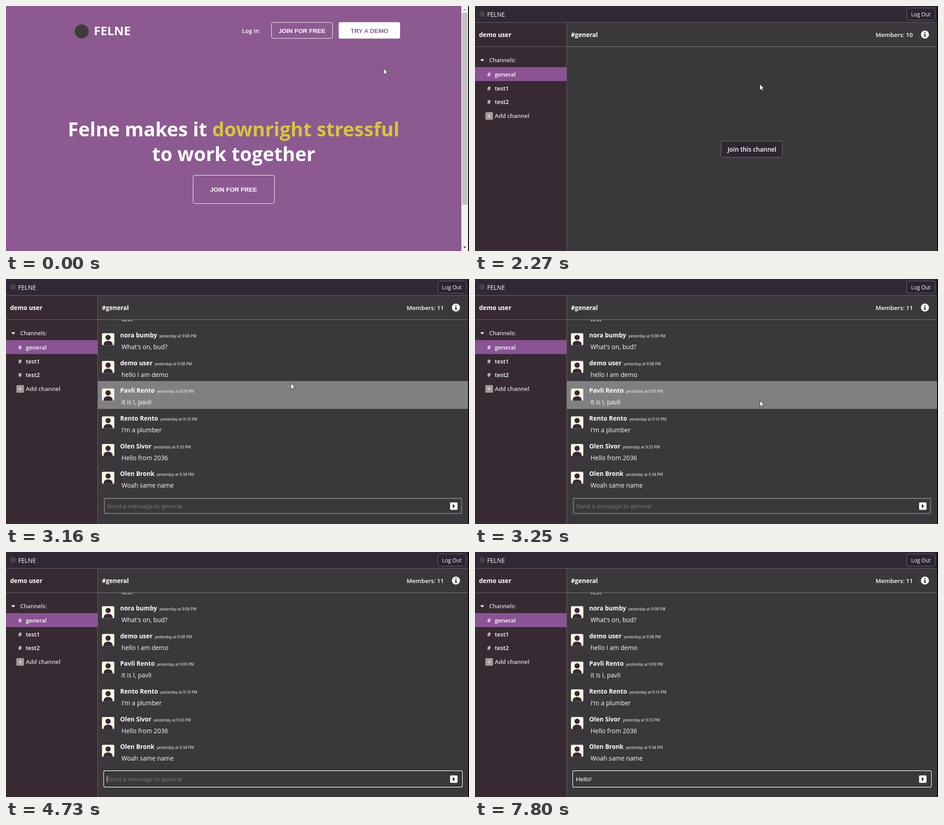
These frames come from a looping animation (1028x545 px, 8 s). An HTML page:

```html
<!DOCTYPE html>
<html lang="en">
<head>
<meta charset="utf-8">
<title>Team chat demo</title>
<style>
html, body { margin: 0; width: 100%; height: 100%; overflow: hidden; background: #000; }
svg { display: block; width: 1028px; height: 545px; font: 13.6px "Open Sans", "Noto Sans", sans-serif; fill: #fff; }
.arial { font-family: "Liberation Sans", Arial, sans-serif; }
.b { font-weight: 700; }
.s { font-weight: 600; }
.mid { text-anchor: middle; }
.end { text-anchor: end; }
.big { font-size: 42.8px; }
.side { font-size: 12.8px; }
.dim { fill: #dcd8da; }
.time { font-size: 8.5px; font-weight: 400; }
.line { fill: none; stroke: #fff; }
</style>
</head>
<body>
<svg viewBox="0 0 1028 545">
  <g id="landing">
    <rect width="1011" height="545" fill="#8c5a90"/>
    <circle cx="168" cy="56.5" r="15.5" fill="#3d3d3c"/>
    <text x="195" y="65" class="b" font-size="26.8">FELNE</text>
    <text x="524" y="60" class="s" font-size="13.2">Log in</text>
    <rect x="589.5" y="36.5" width="135.5" height="35.5" rx="4" class="line"/>
    <rect id="demo" x="738.5" y="36" width="136.5" height="36.5" rx="4"/>
    <rect x="415.5" y="376.5" width="180.5" height="63" rx="4" class="line"/>
    <g class="arial b mid">
      <text x="657" y="59.7">JOIN FOR FREE</text>
      <text x="807" y="59.7" fill="#8c5a90">TRY A DEMO</text>
      <text x="505.3" y="413">JOIN FOR FREE</text>
    </g>
    <g class="b big mid">
      <text x="505.5" y="290">Felne makes it <tspan fill="#d6c540">downright stressful</tspan></text>
      <text x="505.5" y="344.7">to work together</text>
    </g>
    <rect x="1011" width="15" height="545" fill="#f1f1f1"/>
    <rect x="1012.5" y="15" width="12" height="427" fill="#c1c1c1"/>
    <path d="M1015 10l3.5-4 3.5 4z" fill="#a3a3a3"/>
    <path d="M1015 535l3.5 4 3.5-4z" fill="#505050"/>
  </g>

  <g id="chat">
    <rect width="1026" height="545" fill="#3a383a"/>
    <rect y="36" width="203" height="509" fill="#372a33"/>
    <g id="join">
      <rect x="546.5" y="300.5" width="136" height="36" rx="3" fill="#2f2633" stroke="#777"/>
      <text x="615" y="323.5" class="s mid">Join this channel</text>
    </g>
    <g id="room">
      <rect id="hover" x="204" width="822" height="62" fill="#808080"/>
      <g id="messages"></g>
      <rect x="204" y="36" width="822" height="54" fill="#3a383a"/>
      <rect x="218.5" y="488" width="793" height="33.5" rx="2" fill="none" stroke="#7d7d7d" stroke-width="2"/>
      <g id="focus" fill="none">
        <rect x="218.5" y="488" width="793" height="33.5" rx="2" fill="#3a383a" stroke="#141414" stroke-width="2"/>
        <rect x="217.2" y="486.7" width="795.8" height="36" rx="3" stroke="#fff" stroke-width="1.4"/>
      </g>
      <text id="hint" x="224" y="510" class="arial" fill="#757575">Send a message to general</text>
      <text id="typed" x="224" y="510" class="arial"></text>
      <rect id="caret" y="497.5" width="1" height="14.5"/>
      <rect x="986" y="497" width="16.5" height="16.5" rx="2"/>
      <path d="M992 500.5l5 4.7-5 4.7z" fill="#2b282b"/>
    </g>

    <rect width="1026" height="36" fill="#302935"/>
    <g stroke="#6c666e">
      <path d="M0 36.5H1026M0 90.5H203M203.5 36V545"/>
      <path d="M204 90.5H1026" stroke="#858385"/>
      <rect x="958.5" y="4.5" width="63" height="27" rx="4" fill="#2c2431"/>
    </g>
    <circle cx="15.5" cy="17.5" r="6.5" fill="#4a4441"/>
    <text x="27" y="23.5">FELNE</text>
    <text x="990" y="22.5" class="mid" font-size="11.8">Log Out</text>
    <text x="9" y="69" class="b">demo user</text>
    <text x="213" y="69" class="b">#general</text>
    <text id="members" x="972" y="69" class="s end" font-size="13.2"></text>
    <circle cx="999" cy="63.5" r="9"/>
    <path d="M997.8 57.5h2.6v2.6h-2.6zM996.6 61.7h3.8v5h1.2v1.9h-5v-1.9h1.2v-3.1h-1.2z" fill="#3a383a"/>

    <rect y="136" width="203" height="31" fill="#8a5394"/>
    <path d="M11.5 118.5h9l-4.5 4.7z"/>
    <g class="s side">
      <text x="31.5" y="124.8" class="dim" font-size="12.5">Channels:</text>
      <text x="27" y="156.5">#</text><text x="44" y="156.8">general</text>
      <text x="27" y="187.5">#</text><text x="44" y="187.6">test1</text>
      <text x="27" y="218">#</text><text x="44" y="218.3">test2</text>
      <text x="44" y="249" class="dim">Add channel</text>
    </g>
    <rect x="23" y="236" width="17" height="17" rx="2" fill="#a09a9c"/>
    <path d="M27.5 244.5h8M31.5 240.5v8" stroke="#eee" stroke-width="1.2"/>
  </g>

  <path id="arrow" d="M.5.8V14.2L3.6 11.4 5.7 16 7.8 15.1 5.7 10.6H9.9Z" stroke="#222" stroke-width=".9"/>
  <path id="hand" d="M4 9V2Q4 .5 5.2.5T6.5 2V6.5Q9 5.8 9.2 7.3 11.3 6.6 11.5 8.2 13.5 7.6 13.5 9.5V13Q13.5 15.5 12 18.5H5.5L.8 12Q0 10 2 10Z" stroke="#222" stroke-width=".9"/>
</svg>
<script>
const LOOP = 8000, ROW = 61.65, TOP = 103.7;
const $ = id => document.getElementById(id);
const show = (id, on) => $(id).style.display = on ? '' : 'none';
const mix = (a, b, k) => a + (b - a) * k;

const posts = [
  ['nora bumby', '9:08', "What's on, bud?"],
  ['demo user', '9:08', 'hello I am demo'],
  ['Pavli Rento', '9:09', 'it is I, pavli'],
  ['Rento Rento', '9:10', "I'm a plumber"],
  ['Olen Sivor', '9:33', 'Hello from 2036'],
  ['Olen Bronk', '9:34', 'Woah same name']
];
$('messages').innerHTML = '<text x="256.5" y="94.3" font-size="13.8">test</text>' +
  posts.map(([name, time, body], i) => `<g transform="translate(0 ${i * ROW})">
    <rect x="213" y="120.5" width="27.5" height="27" rx="3" fill="#fcf4e6"/>
    <circle cx="226.7" cy="130" r="5.8" fill="#372a33"/>
    <path d="M216.5 147.5Q216.5 137.5 226.7 137.5T237 147.5Z" fill="#372a33"/>
    <text x="253.5" y="130" class="b">${name}<tspan dx="5" class="time">yesterday at ${time} PM</tspan></text>
    <text x="256.5" y="156" font-size="13.8">${body}</text></g>`).join('');

// Number of steps taken, the first at time a and the last (n) at time b.
const steps = (t, a, b, n) =>
  Math.max(0, Math.min(n, Math.floor((t - a) / (b - a) * (n - 1) + 1e-6) + 1));

const keys = [5620, 5810, 6010, 6700, 6900, 7300];
const blinks = [[4730, 5220], [5620, 6510], [6700, 7800]];

function pointer(t) {
  if (t < 790) {
    const k = steps(t, 100, 390, 4) / 4;
    return [mix(838, 804, k), mix(138, 45, k)];
  }
  if (t < 2870) {
    const k = steps(t, 1090, 1470, 5) / 5;
    return [mix(806, 632, k), mix(49, 173, k)];
  }
  const k = (steps(t, 2870, 3630, 9) - 1) / 8;
  return [632, 173 + 332 * k ** 1.78];
}

function draw(t) {
  const chat = t >= 2270, room = t >= 2870;
  show('landing', !chat);
  show('chat', chat);
  show('join', !room);
  show('room', room);

  const [x, y] = pointer(t);
  const onDemo = !chat && x > 739 && x < 875 && y > 36 && y < 72;
  $('demo').setAttribute('fill', onDemo ? '#f0e6f1' : '#fff');
  show('hand', onDemo);
  show('arrow', !onDemo && y < 487);
  $('hand').setAttribute('transform', `translate(${x - 5} ${y})`);
  $('arrow').setAttribute('transform', `translate(${x} ${y})`);

  const row = Math.floor((y - TOP) / ROW);
  show('hover', row < posts.length);
  $('hover').setAttribute('y', TOP + row * ROW);
  $('members').textContent = 'Members: ' + (t < 2570 ? 10 : 11);

  const text = 'Hello!'.slice(0, keys.filter(k => t >= k).length);
  $('typed').textContent = text;
  show('hint', !text);
  show('focus', t >= 4730);
  show('caret', blinks.some(([a, b]) => t >= a && t < b));
  $('caret').setAttribute('x', 224 + (text ? Math.round($('typed').getComputedTextLength()) : 0));
}

function tick() {
  draw(performance.now() % LOOP);
  requestAnimationFrame(tick);
}
tick();
</script>
</body>
</html>
```
